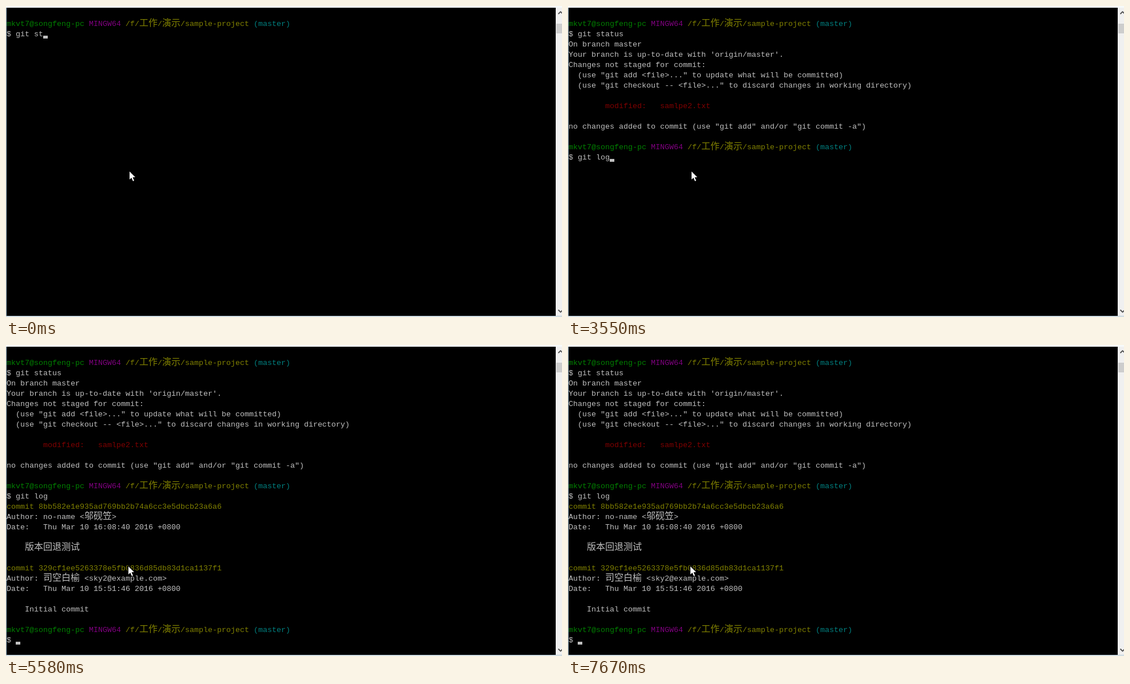
An HTML page that plays this animation: 972 px wide and 545 px high, repeating every 8000 ms.

```html
<!DOCTYPE html>
<html lang="en">
<head>
<meta charset="utf-8">
<title>Terminal session</title>
<style>
  html, body { margin: 0; width: 100%; height: 100%; overflow: hidden; background: #000; }
  svg { display: block; width: 972px; height: 545px; }
  text { font: 13.333px "Liberation Mono", monospace; white-space: pre; }
  .cjk { font: 300 16px "Noto Sans CJK SC", "Noto Sans CJK", sans-serif; }
  #mouse { animation: glide 8s linear infinite; }
  @keyframes glide {
    0%, 61% { transform: translate(216px, 290px); }
    64.5% { transform: translate(195px, 366px); }
    67.8%, 100% { transform: translate(214px, 388px); }
  }
</style>
</head>
<body>
<svg viewBox="0 0 972 545" xmlns="http://www.w3.org/2000/svg">
  <rect width="972" height="545" fill="#000"/>
  <g id="screen"></g>
  <rect id="caret" width="8" height="5" fill="#c0c0c0"/>

  <!-- window edges -->
  <rect width="1" height="545" fill="#a9c4d6"/>
  <rect width="972" height="3" fill="#f7fafa"/>
  <rect y="543" width="972" height="1" fill="#b4c8d4"/>
  <rect y="544" width="972" height="1" fill="#e6ecec"/>

  <!-- scrollbar -->
  <rect x="961" y="3" width="11" height="540" fill="#f0f0f0"/>
  <rect x="962" y="31" width="10" height="17" fill="#cdcdcd"/>
  <path d="M965.5 14l4-4 4 4M965.5 532.5l4 4 4-4" fill="none" stroke="#505050" stroke-width="1.8"/>

  <path id="mouse" d="M0 0V14L3.3 11 6 17 8 16 5.5 10.3 10 10Z"
        fill="#fff" stroke="#000" stroke-width="2" paint-order="stroke"/>
</svg>
<script>
const LOOP = 8000, CELL = 8, ROW = 18, KEY_GAP = 120, BLINK = 525;
const GRAY = '#c0c0c0', GREEN = '#008000', PURPLE = '#800080', OLIVE = '#808000',
      TEAL = '#008080', RED = '#800000', INVERTED = '#7f7fff';

const screen = document.getElementById('screen');
const caret = document.getElementById('caret');
const timed = [];
const caretMoves = [];
let row = 0, col = 0;

const colX = c => 1 + c * CELL;
const rowY = r => 3 + r * ROW;

function add(name, attrs, from, to = LOOP) {
  const el = document.createElementNS('http://www.w3.org/2000/svg', name);
  for (const key in attrs) el.setAttribute(key, attrs[key]);
  screen.append(el);
  timed.push({ el, from, to });
  return el;
}

// Writes at the current cell; Chinese characters take two cells.
function put(text, color, from, to) {
  for (const part of text.match(/[\u4e00-\u9fff]+|[^\u4e00-\u9fff]+/g) || []) {
    const wide = part >= '\u4e00';
    const attrs = { x: colX(col), y: rowY(row) + 14, fill: color, class: wide ? 'cjk' : 'latin' };
    add('text', attrs, from, to).textContent = part;
    col += part.length * (wide ? 2 : 1);
  }
}

function newline() {
  row++;
  col = 0;
}

// The caret stays lit for `lit` ms after a move, then blinks.
const moveCaret = (time, lit = 400) => caretMoves.push({ time, row, col, lit });

function print(time, color, ...lines) {
  for (const line of lines) {
    put(line, color, time);
    newline();
  }
}

function prompt(time) {
  newline();
  put('mkvt7@songfeng-pc ', GREEN, time);
  put('MINGW64 ', PURPLE, time);
  put('/f/工作/演示/sample-project ', OLIVE, time);
  put('(master)', TEAL, time);
  newline();
  put('$ ', GRAY, time);
  moveCaret(time, 280);
}

function type(text, start) {
  [...text].forEach((char, i) => {
    put(char, GRAY, start + i * KEY_GAP);
    moveCaret(start + i * KEY_GAP);
  });
}

function enter(time) {
  newline();
  moveCaret(time);
}

function select(atRow, atCol, text, from, to) {
  [row, col] = [atRow, atCol];
  const width = text.length * CELL;
  add('rect', { x: colX(col), y: rowY(row), width, height: ROW, fill: '#fff' }, from, to);
  put(text, INVERTED, from, to);
}

prompt(-1000);
type('git status', 150 - 7 * KEY_GAP);
enter(570);
moveCaret(690, 0);
print(690, GRAY,
  'On branch master',
  "Your branch is up-to-date with 'origin/master'.",
  'Changes not staged for commit:',
  '  (use "git add <file>..." to update what will be committed)',
  '  (use "git checkout -- <file>..." to discard changes in working directory)',
  '');
print(690, RED, '        modified:   samlpe2.txt', '');
print(690, GRAY, 'no changes added to commit (use "git add" and/or "git commit -a")');

prompt(1120);
type('git ', 2240);
type('log', 3280);
enter(3920);
print(4040, OLIVE, 'commit 8bb582e1e935ad769bb2b74a6cc3e5dbcb23a6a6');
print(4040, GRAY,
  'Author: no-name <邬砚笠>',
  'Date:   Thu Mar 10 16:08:40 2016 +0800',
  '',
  '    版本回退测试',
  '');
const hash = '329cf1ee5263378e5fb0836d85db83d1ca1137f1';
const hashRow = row, hashCol = 'commit '.length, clicked = 19;
print(4040, OLIVE, 'commit ' + hash);
print(4040, GRAY,
  'Author: 司空白榆 <sky2@example.com>',
  'Date:   Thu Mar 10 15:51:46 2016 +0800',
  '',
  '    Initial commit');
moveCaret(4040);
prompt(4750);

// A click marks one cell, the double click takes the whole word.
select(hashRow, hashCol + clicked, hash[clicked], 5700, 5980);
select(hashRow, hashCol, hash + ' ', 5980, 6560);

function draw(time) {
  for (const { el, from, to } of timed) {
    el.style.display = time >= from && time < to ? '' : 'none';
  }
  const move = caretMoves.findLast(m => m.time <= time);
  const blinks = Math.floor((time - move.time - move.lit) / BLINK);
  caret.style.display = blinks < 0 || blinks % 2 ? '' : 'none';
  caret.setAttribute('x', colX(move.col));
  caret.setAttribute('y', rowY(move.row) + 13);
}

const start = performance.now();
function tick() {
  draw((performance.now() - start) % LOOP);
  requestAnimationFrame(tick);
}
tick();
</script>
</body>
</html>
```
